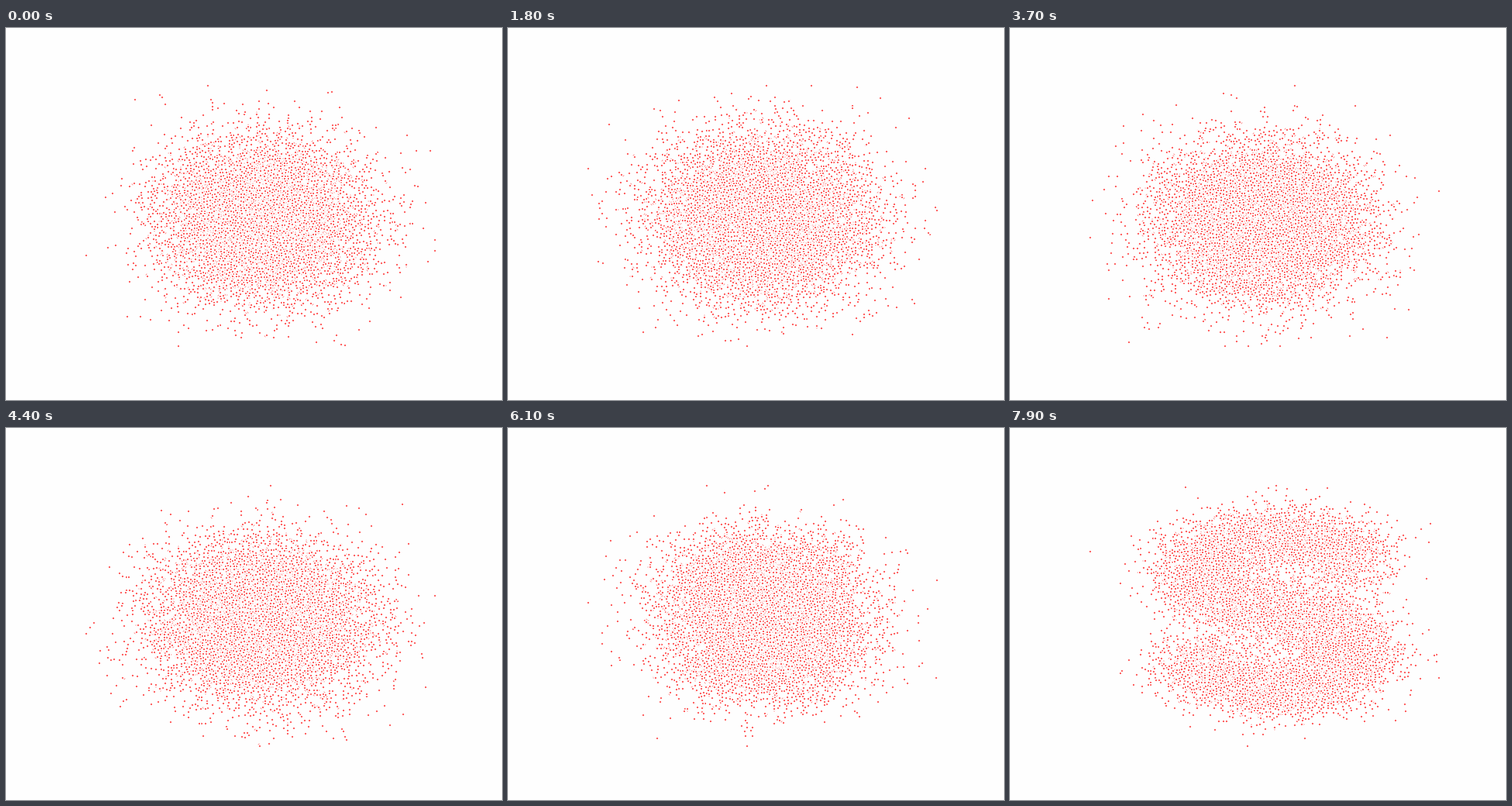
A matplotlib script that plays this animation: 640 px wide and 480 px high, repeating every 8000 ms.

```python
import numpy as np
import matplotlib.pyplot as plt
from matplotlib.animation import FuncAnimation

COUNT = 10000
STEPS = 100
FRAMES = 80
SPREAD = 3.7  # farthest a point may stray, in standard deviations
PAPER = "#fefefe"

rng = np.random.default_rng(7)


def s_curve(n):
    t = 3 * np.pi * (rng.random(n) - 0.5)
    pts = np.column_stack([np.sin(t), np.sign(t) * (np.cos(t) - 1)])
    return (pts + 0.1 * rng.standard_normal((n, 2))) / 10


def diffuse(x):
    """Noise the curve step by step with a sigmoid beta schedule."""
    beta = 0.00499 / (1 + np.exp(-np.linspace(-6, 6, STEPS))) + 1e-5
    states = []
    for b in beta:
        x = np.sqrt(1 - b) * x + np.sqrt(b) * rng.standard_normal(x.shape)
        states.append(x)
    return np.array(states)


def drop_strays(states):
    mean = states.mean(axis=1, keepdims=True)
    z = (states - mean) / states.std(axis=1, keepdims=True)
    return states[:, (np.abs(z) < SPREAD).all(axis=(0, 2))]


# Played backwards, the noise gathers into the S-shaped curve.
states = drop_strays(diffuse(s_curve(COUNT)))[::-1]

fig, ax = plt.subplots(figsize=(6.4, 4.8), dpi=100, facecolor=PAPER)
ax.axis("off")
# The wide pale edges cover the dots beneath and keep the cloud airy.
dots = ax.scatter([], [], s=6.25, color="red", edgecolor=PAPER, linewidth=1.15)


def limits(v):
    pad = 0.05 * np.ptp(v)
    return v.min() - pad, v.max() + pad


def draw(frame):
    pts = states[max(frame - 1, 0)]
    dots.set_offsets(pts)
    ax.set_xlim(*limits(pts[:, 0]))
    ax.set_ylim(*limits(pts[:, 1]))
    return [dots]


anim = FuncAnimation(fig, draw, frames=FRAMES, init_func=lambda: draw(0),
                     interval=100, repeat=True, repeat_delay=0, blit=False)
plt.show()
```
